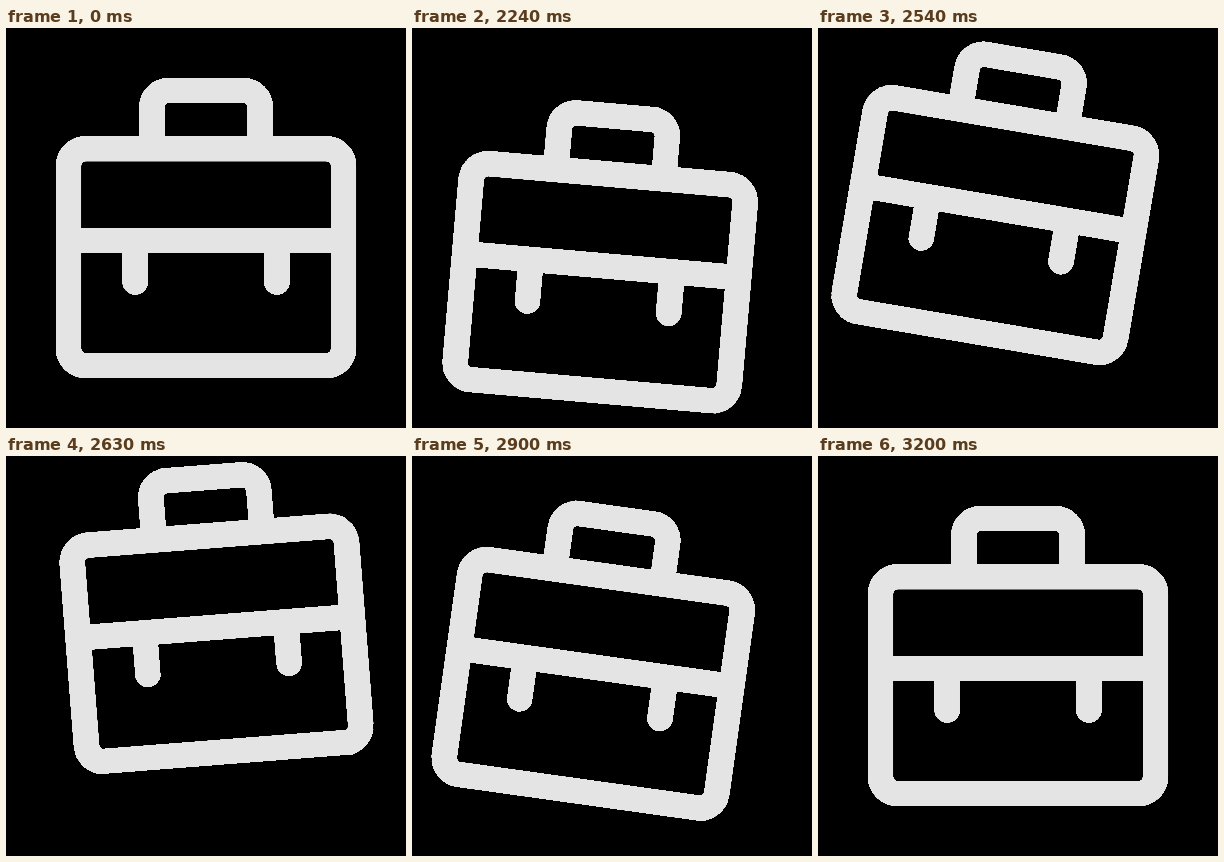
These frames come from a looping animation (400x400 px, 3.23 s). An HTML page:

```html
<!DOCTYPE html>
<html lang="en">
<head>
<meta charset="utf-8">
<title>Briefcase</title>
<style>
  html, body {
    margin: 0;
    width: 100%;
    height: 100%;
    overflow: hidden;
    background: #000;
  }
  svg {
    display: block;
    width: 100%;
    height: 100%;
    fill: none;
    stroke: #e4e4e4;
    stroke-width: 1.5;
  }
  .hop, .swing {
    animation: hop 3230ms cubic-bezier(.33, 0, .67, 1) infinite;
  }
  .swing {
    animation-name: swing;
    transform-origin: 12px 5.64px;
  }
  /* dip, jump, land */
  @keyframes hop {
    0%, 61.92% { transform: translateY(0); }
    71.21% { transform: translateY(1.71px); }
    81.14% { transform: translateY(-2.46px); }
    89.78%, 100% { transform: translateY(0); }
  }
  @keyframes swing {
    0%, 63.78% { transform: rotate(0deg); }
    77.06% { transform: rotate(13deg); }
    84.39% { transform: rotate(-14deg); }
    91.06% { transform: rotate(10.2deg); }
    99.07%, 100% { transform: rotate(0deg); }
  }
</style>
</head>
<body>
<svg viewBox="0 0 24 24">
  <!-- hard one-bit edges -->
  <filter id="hard" filterUnits="userSpaceOnUse" x="0" y="0" width="24" height="24" color-interpolation-filters="sRGB">
    <feComponentTransfer>
      <feFuncA type="linear" slope="20" intercept="-4.5"/>
    </feComponentTransfer>
  </filter>
  <g filter="url(#hard)">
    <g class="hop">
      <g class="swing">
        <rect x="3.75" y="7.25" width="16.5" height="13" rx="1"/>
        <path d="M8.75 7V4.75a1 1 0 0 1 1-1h4.5a1 1 0 0 1 1 1V7M4 12.75h16"/>
        <path d="M7.75 13v2.25M16.25 13v2.25" stroke-linecap="round"/>
      </g>
    </g>
  </g>
</svg>
</body>
</html>
```
